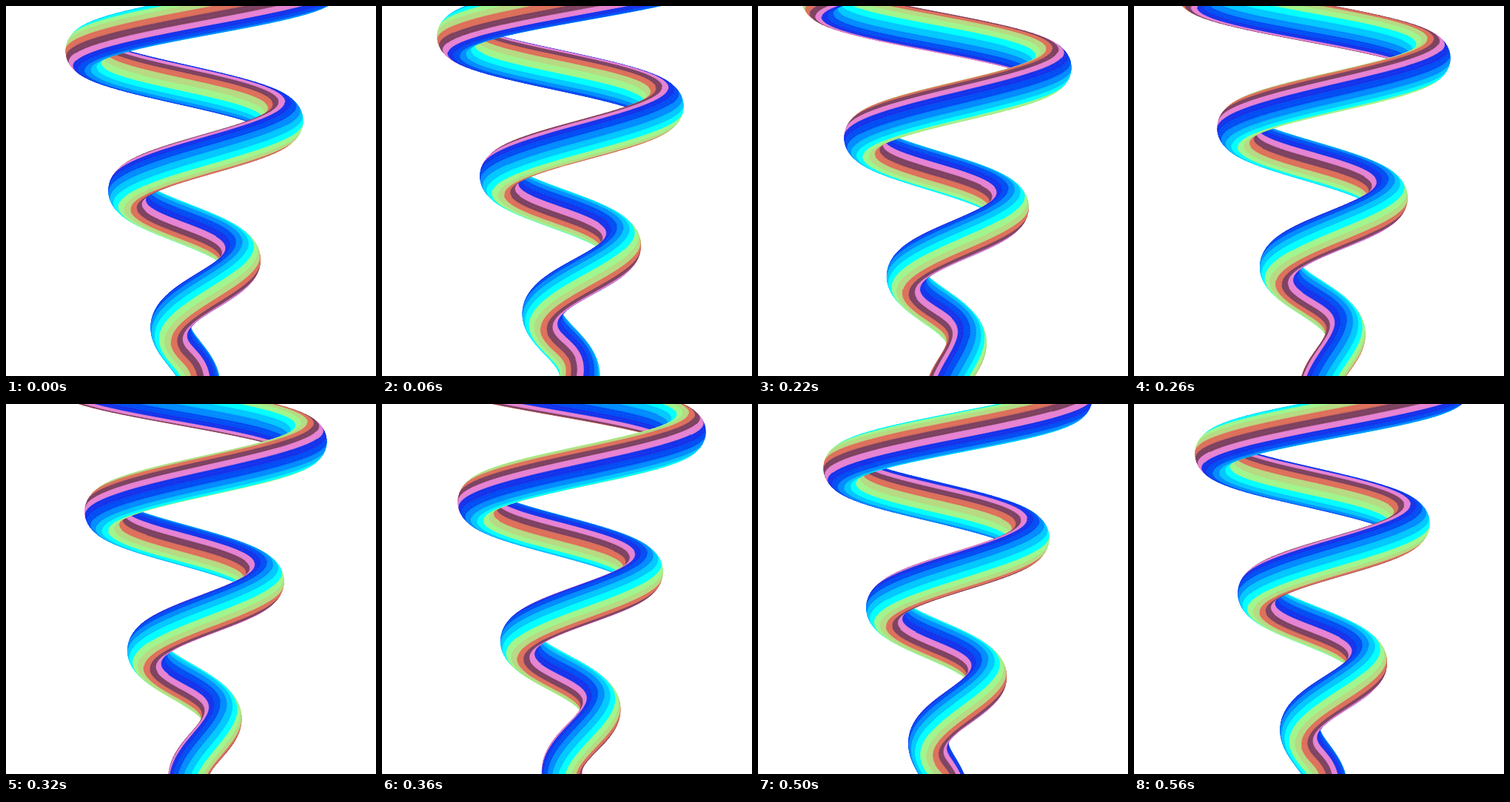
Recreate the animation shown at these times as an HTML page with a canvas. Size 500 by 500 pixels, loop 580 ms.

```html
<!DOCTYPE html>
<html lang="en">
<head>
<meta charset="utf-8">
<title>Striped spiral</title>
<style>
  html, body { margin: 0; width: 100%; height: 100%; overflow: hidden; background: #fff; }
  canvas { display: block; }
</style>
</head>
<body>
<canvas width="500" height="500"></canvas>
<script>
const ctx = document.querySelector('canvas').getContext('2d');
const LOOP = 580, STEP = 20;
const COLORS = ['#e682d2', '#1432eb', '#004df4', '#008cff', '#00c8ff',
                '#00ffff', '#a0f58c', '#b6da82', '#dd6f5a', '#7d4160'];
const STRIPES = 20, FACETS = 2;       // the palette runs twice around the tube
const CX = 255.5, TUBE = 26.8;
const PITCH = 190 / (2 * Math.PI);    // drop per radian
const TAPER = 0.3053;                 // cone radius lost per pixel of drop
const TOP = -48, BOTTOM = 543, SLICE = 3;

const cross = (a, b) => [a[1] * b[2] - a[2] * b[1],
                         a[2] * b[0] - a[0] * b[2],
                         a[0] * b[1] - a[1] * b[0]];
const dot = (a, b) => a[0] * b[0] + a[1] * b[1] + a[2] * b[2];
const unit = a => a.map(v => v / Math.hypot(...a));

// Stripe that faces outwards: twist-free frame, a slight extra twist, half a spin per loop
function facingStripe(y, radius, turn) {
  const twist = STRIPES / (2 * Math.PI) / TAPER;
  return twist * Math.asinh(radius / (PITCH * Math.hypot(1, TAPER)))
    - 15.09 - 0.0026 * y - 10 * turn;
}

// Ring of surface points at height y; x right, y down, z towards the viewer
function ring(y, turn) {
  const radius = 90.1 - TAPER * (y - 251);
  const angle = (y - 157.5) / PITCH + 2 * Math.PI * turn;
  const c = Math.cos(angle), s = Math.sin(angle), w = radius / PITCH;
  const along = unit([-TAPER * c - w * s, 1, -TAPER * s + w * c]);
  const lean = dot([c, 0, s], along);
  const out = unit([c - along[0] * lean, -along[1] * lean, s - along[2] * lean]);
  const down = cross(along, out);
  const facing = facingStripe(y, radius, turn);

  const points = [];
  for (let i = 0; i <= STRIPES * FACETS; i++) {
    const a = (i / FACETS - facing) * 2 * Math.PI / STRIPES;
    const n = out.map((v, k) => v * Math.cos(a) + down[k] * Math.sin(a));
    points.push({
      x: CX + radius * c + TUBE * n[0],
      y: y + TUBE * n[1],
      z: radius * s + TUBE * n[2],
      nz: n[2]
    });
  }
  return points;
}

function draw(turn) {
  const quads = [];
  let upper = ring(TOP, turn);
  for (let y = TOP + SLICE; y <= BOTTOM; y += SLICE) {
    const lower = ring(y, turn);
    for (let i = 0; i < STRIPES * FACETS; i++) {
      const p = [upper[i], upper[i + 1], lower[i + 1], lower[i]];
      if (p.every(v => v.nz < -0.05)) continue;
      quads.push({
        p,
        z: p[0].z + p[1].z + p[2].z + p[3].z,
        color: COLORS[Math.floor(i / FACETS) % COLORS.length]
      });
    }
    upper = lower;
  }
  quads.sort((a, b) => a.z - b.z);

  ctx.fillStyle = '#fff';
  ctx.fillRect(0, 0, 500, 500);
  ctx.lineWidth = 0.6;                // closes the seams between quads
  ctx.lineJoin = 'round';
  for (const { p, color } of quads) {
    ctx.fillStyle = ctx.strokeStyle = color;
    ctx.beginPath();
    for (const v of p) ctx.lineTo(v.x, v.y);
    ctx.closePath();
    ctx.fill();
    ctx.stroke();
  }
}

const start = performance.now();
let shown = -1;
function tick() {
  const time = (performance.now() - start) % LOOP;
  const step = Math.floor(time / STEP);
  if (step !== shown) draw((shown = step) * STEP / LOOP);
  requestAnimationFrame(tick);
}
tick();
</script>
</body>
</html>
```
